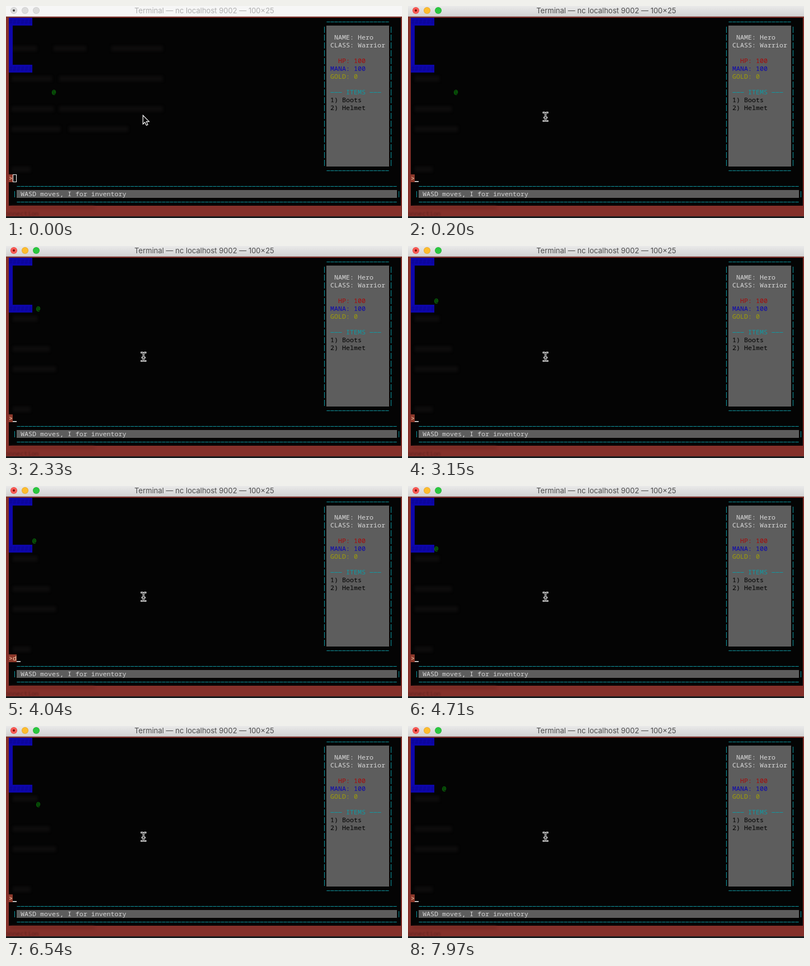
Animation, 707 px wide and 379 px high, one loop 8000 ms. Source, as an HTML page with a canvas:

```html
<!DOCTYPE html>
<html lang="en">
<head>
<meta charset="utf-8">
<title>Terminal game</title>
<style>
html, body { margin: 0; width: 707px; height: 379px; overflow: hidden; background: #000; }
canvas { display: block; }
</style>
</head>
<body>
<canvas id="stage" width="707" height="379"></canvas>
<script>
const ctx = document.getElementById('stage').getContext('2d');
const LOOP = 8000, CW = 7, CH = 14, LEFT = 5, TOP = 21;
const MONO = '11.667px "Noto Sans Mono", monospace';
const CYAN = '#0f99a3', GRAY = '#5d5d5d', BRICK = '#84302a', BLUE = '#0d06ab';

// Each command: when it is typed, when it is entered, which key.
const commands = [
  [680, 740, 'w'],
  [1100, 1160, 'a'], [1240, 1300, 'a'], [1450, 1510, 'a'], [1620, 1680, 'w'], [1830, 1890, 'w'],
  [2270, 2330, 'a'],
  [2740, 2790, 'w'], [2960, 3010, 'a'], [3190, 3240, 'a'], [3420, 3470, 'a'],
  [3860, 3890, 'd'], [3950, 3980, 'd'], [4040, 4070, 'd'], [4250, 4290, 's'], [4520, 4560, 'a'], [4840, 4880, 'a'],
  [5090, 5140, 's'], [5290, 5340, 'a'], [5500, 5520, 'a'], [5660, 5700, 'w'], [5840, 5880, 'd'], [6040, 6080, 'd'],
  [6170, 6230, 'd'], [6490, 6540, 's'], [6690, 6740, 'd'], [6900, 6940, 'w'], [7100, 7140, 'a'],
  [7290, 7330, 'd'], [7480, 7520, 's'],
  [7820, 7850, 'w'], [7920, 7970, 'w']
];
const steps = { w: [0, -1], a: [-1, 0], s: [0, 1], d: [1, 0] };
const isWall = (c, r) => c === 0 || (c < 6 && (r === 0 || r === 6));

const colX = c => LEFT + c * CW;
const rowY = r => TOP + r * CH;

function box(x, y, w, h, color) {
  ctx.fillStyle = color;
  ctx.fillRect(x, y, w, h);
}
const cells = (c, r, w, h, color) => box(colX(c), rowY(r), w * CW, h * CH, color);

function write(c, r, text, color) {
  ctx.font = MONO;
  ctx.textAlign = 'left';
  ctx.fillStyle = color;
  ctx.fillText(text, colX(c), rowY(r) + 11);
}
function rule(c, r, n) {
  for (let i = 0; i < n; i++) box(colX(c + i) + .4, rowY(r) + 7, CW - .8, 1, CYAN);
}
function bars(c, r, n) {
  for (let i = 0; i < n; i++) box(colX(c) + 3, rowY(r + i) + 2, 1, 11, CYAN);
}
function dot(x, y, r, color) {
  ctx.fillStyle = color;
  ctx.beginPath();
  ctx.arc(x, y, r, 0, 7);
  ctx.fill();
}

function titleBar(active) {
  const fill = ctx.createLinearGradient(0, 0, 0, 19);
  fill.addColorStop(0, active ? '#e9e9e9' : '#f6f6f6');
  fill.addColorStop(1, active ? '#d2d2d2' : '#f6f6f6');
  box(0, 0, 707, 19, fill);
  box(0, 18, 707, 1, active ? '#b5b5b5' : '#d8d8d8');
  const rims = active ? ['#e2463f', '#dfa023', '#1dad2b'] : Array(3).fill('#c6c6c6');
  const lights = active ? ['#fc5b56', '#fdbd2e', '#2bc840'] : Array(3).fill('#dcdcdc');
  lights.forEach((color, i) => {
    dot(14 + 20 * i, 8, 6, rims[i]);
    dot(14 + 20 * i, 8, 5.4, color);
  });
  dot(14, 8, 2, active ? '#7a0c08' : '#444');
  ctx.font = '13px Inter, sans-serif';
  ctx.textAlign = 'center';
  ctx.fillStyle = active ? '#4b4b4b' : '#b0b0b0';
  ctx.fillText('Terminal — nc localhost 9002 — 100×25', 354, 13);
}

// Faint text of the window behind, seen through the terminal.
function ghosts(active) {
  const spans = active
    ? [[130, 12, 56], [184, 12, 78], [220, 12, 89], [292, 12, 44]]
    : [[76, 10, 55], [76, 85, 143], [76, 188, 280], [130, 10, 82], [130, 95, 280],
       [184, 10, 85], [184, 95, 280], [220, 10, 97], [220, 112, 218], [292, 10, 44]];
  ctx.save();
  ctx.filter = 'blur(2px)';
  for (const [y, from, to] of spans) box(from, y - 5, to - from, 10, '#0d0c0c');
  box(8, 358, 150, 5, '#782b25');
  ctx.filter = 'blur(1px)';
  ctx.font = '11px "Noto Sans Mono", monospace';
  ctx.textAlign = 'left';
  ctx.fillStyle = '#5b211d';
  ctx.fillText('onnection', -1, 375);
  ctx.restore();
}

function sidePanel() {
  cells(81, 1, 16, 18, GRAY);
  rule(81, 0, 16);
  rule(81, 19, 16);
  bars(80, 1, 18);
  bars(97, 1, 18);
  write(83, 2, 'NAME: Hero', '#dadada');
  write(82, 3, 'CLASS: Warrior', '#dadada');
  write(84, 5, 'HP: 100', '#a80808');
  write(82, 6, 'MANA: 100', '#0a05b0');
  write(82, 7, 'GOLD: 0', '#a09e08');
  rule(82, 9, 3);
  write(86, 9, 'ITEMS', CYAN);
  rule(92, 9, 3);
  write(82, 10, '1) Boots', '#000');
  write(82, 11, '2) Helmet', '#000');
}

function messageBox() {
  rule(2, 21, 97);
  cells(2, 22, 97, 1, GRAY);
  rule(2, 23, 97);
  bars(1, 22, 1);
  bars(99, 22, 1);
  write(3, 22, 'WASD moves, I for inventory', '#d6d6d6');
}

function room() {
  cells(0, 0, 6, 1, BLUE);
  cells(0, 1, 1, 5, BLUE);
  cells(0, 6, 6, 1, BLUE);
  for (const r of [0, 6]) write(0, r, '######', '#0c0692');
}

function prompt(typed, active) {
  const line = '>' + typed;
  cells(0, 20, line.length, 1, '#8c382a');
  write(0, 20, line, '#f3cfae');
  const x = colX(line.length), y = rowY(20);
  if (active) return box(x, y + 12, CW, 1.5, '#fff');
  ctx.strokeStyle = '#fff';
  ctx.lineWidth = 1;
  ctx.strokeRect(x + .5, y + .5, CW - 1, CH - 1);
}

function arrow() {
  const path = new Path2D('M244.5 195.5v15.5l3.5-3.3 2.5 5.6 2.7-1.2-2.5-5.4h4.8z');
  ctx.fillStyle = '#000';
  ctx.fill(path);
  ctx.strokeStyle = '#fff';
  ctx.lineWidth = 1.2;
  ctx.stroke(path);
}
function beam() {
  const path = new Path2D('M242 190.5q3.5 0 3.5 2.5q0-2.5 3.5-2.5M245.5 193v10M242 205.5q3.5 0 3.5-2.5q0 2.5 3.5 2.5M243.5 199.5h4');
  ctx.lineCap = 'square';
  for (const [width, color] of [[3, '#fff'], [1, '#000']]) {
    ctx.lineWidth = width;
    ctx.strokeStyle = color;
    ctx.stroke(path);
  }
}

function gameAt(t) {
  let col = 11, row = 9, typed = '';
  for (const [press, enter, key] of commands) {
    if (t < press) break;
    if (t < enter) { typed = key; break; }
    const [dx, dy] = steps[key];
    if (!isWall(col + dx, row + dy)) { col += dx; row += dy; }
  }
  return { col, row, typed };
}

function draw(t) {
  const active = t >= 120;
  const { col, row, typed } = gameAt(t);
  box(0, 0, 707, 379, BRICK);
  box(0, 376, 707, 3, '#191b1d');
  box(LEFT, TOP, 700, 336, '#040404');
  titleBar(active);
  ghosts(active);
  room();
  write(col, row, '@', '#0b9a0b');
  sidePanel();
  messageBox();
  prompt(typed, active);
  if (t < 160) arrow(); else beam();
}

const start = performance.now();
function tick() {
  draw((performance.now() - start) % LOOP);
  requestAnimationFrame(tick);
}
tick();
</script>
</body>
</html>
```
